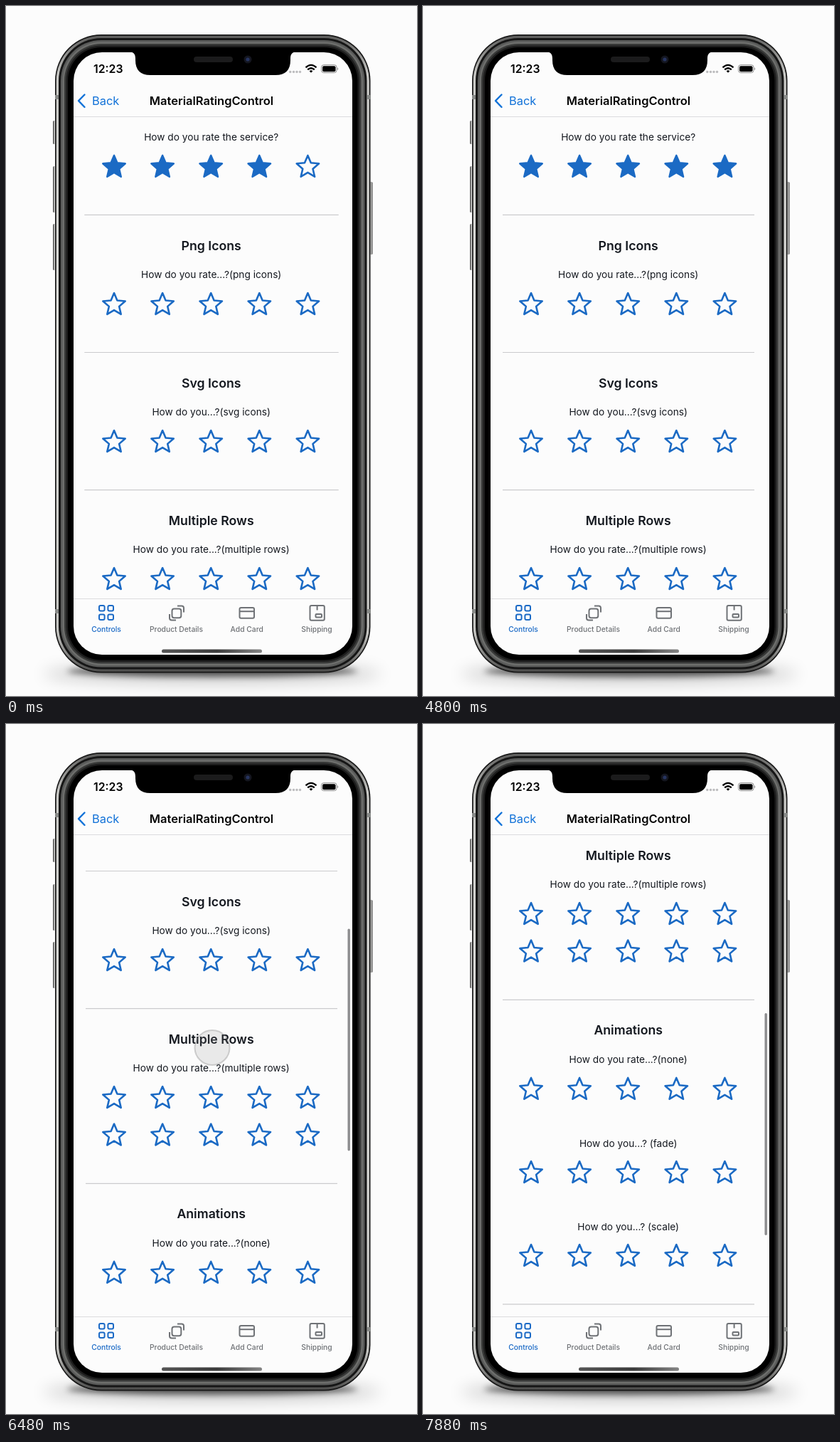
Write an HTML page that moves like this. It is 578x969 px and loops after 8000 ms.

```html
<!DOCTYPE html>
<html lang="en">
<head>
<meta charset="utf-8">
<title>Rating control</title>
<style>
html, body { margin: 0; width: 100%; height: 100%; overflow: hidden; background: #fcfcfc; }
svg { display: block; width: 100vw; height: 100vh; }
text { font-family: Inter, Roboto, sans-serif; fill: #14181f; }
.mid { text-anchor: middle; }
.head { font-size: 17.7px; font-weight: 600; }
.ask { font-size: 13.7px; }
.tab { font-size: 10.3px; font-weight: 500; fill: #6f7276; }
.icon { fill: none; stroke: #6f7276; stroke-width: 2; stroke-linejoin: round; }
.on.tab { fill: #1b6ac6; }
.on.icon { stroke: #1b6ac6; }
.star { fill: none; stroke: #1b6ac4; stroke-width: 1.65; stroke-linejoin: round; }
.star.full { fill: #1b6ac4; }
.rule { stroke: #cbcbcd; stroke-width: 1.2; }
</style>
</head>
<body>
<svg viewBox="0 0 578 969" preserveAspectRatio="none">
  <defs>
    <linearGradient id="steel" x1="0" y1="0" x2="0" y2="1">
      <stop offset="0" stop-color="#5b5b5a"/><stop offset=".06" stop-color="#c9c9c6"/>
      <stop offset=".5" stop-color="#e2e2df"/><stop offset=".94" stop-color="#c4c4c1"/>
      <stop offset="1" stop-color="#4c4c4b"/>
    </linearGradient>
    <linearGradient id="button">
      <stop offset="0" stop-color="#333"/><stop offset=".5" stop-color="#d4d4d2"/><stop offset="1" stop-color="#444"/>
    </linearGradient>
    <linearGradient id="bar">
      <stop offset="0" stop-color="#555"/><stop offset=".55" stop-color="#3c3c3c"/><stop offset="1" stop-color="#858585"/>
    </linearGradient>
    <filter id="soft" x="-20%" y="-200%" width="140%" height="500%"><feGaussianBlur stdDeviation="11"/></filter>
    <filter id="near" x="-20%" y="-200%" width="140%" height="500%"><feGaussianBlur stdDeviation="4"/></filter>
    <clipPath id="view"><rect x="95" y="156" width="392" height="676"/></clipPath>
  </defs>

  <ellipse cx="290" cy="938" rx="238" ry="13" fill="#000" opacity=".2" filter="url(#soft)"/>
  <ellipse cx="290" cy="934" rx="204" ry="8" fill="#000" opacity=".6" filter="url(#near)"/>

  <g fill="url(#button)">
    <rect x="66" y="161" width="5" height="33" rx="1.5"/>
    <rect x="66" y="225" width="5" height="65" rx="1.5"/>
    <rect x="66" y="306" width="5" height="65" rx="1.5"/>
    <rect x="510.500" y="247" width="5" height="102" rx="1.500"/>
  </g>
  <g id="body"></g>
  <g fill="#888a88">
    <rect x="69" y="125" width="5" height="6"/><rect x="508" y="125" width="5" height="6"/>
    <rect x="69" y="847" width="5" height="6"/><rect x="508" y="847" width="5" height="6"/>
  </g>
  <rect x="95" y="65" width="392" height="846" rx="40" fill="#fcfcfc"/>
  <path d="M174 64C180 65 182 68 182 74V76Q182 97 203 97H379Q400 97 400 76V74C400 68 402 65 408 64Z"/>
  <rect x="264" y="71" width="55" height="8" rx="4" fill="#1b1b1c"/>
  <circle cx="340" cy="75" r="5.500" fill="#14161f"/>
  <circle cx="340" cy="75" r="2.600" fill="#26345f"/>

  <g clip-path="url(#view)">
    <g id="list"></g>
    <rect id="thumb" x="480.500" width="3.400" height="312" rx="1.700" fill="#8c8c8e"/>
  </g>

  <text x="123" y="94" font-size="15.800" font-weight="600" style="fill:#000">12:23</text>
  <g fill="#bcbcbe">
    <circle cx="399.800" cy="92.500" r="1.700"/><circle cx="404.500" cy="92.500" r="1.700"/>
    <circle cx="409" cy="92.500" r="1.700"/><circle cx="413.500" cy="92.500" r="1.700"/>
  </g>
  <g fill="none" stroke="#000" stroke-width="2.300">
    <path d="M421.500 86.400Q429 79.400 436.500 86.400M424.200 89.400Q429 85 433.800 89.400"/>
    <path d="M426.600 91.300Q429 89.300 431.400 91.300L429 93.800Z" fill="#000" stroke="none"/>
  </g>
  <rect x="443.500" y="82.700" width="21.500" height="11" rx="3.300" fill="none" stroke="#8d8d8d"/>
  <rect x="445" y="84.200" width="18.500" height="8" rx="2"/>
  <path d="M466.200 86.200Q468.400 88.200 466.200 90.200Z" fill="#8d8d8d"/>

  <path d="M110.500 124.500L102 133.200L110.500 142" fill="none" stroke="#1272d8" stroke-width="2.400" stroke-linecap="round" stroke-linejoin="round"/>
  <text x="121" y="139" font-size="16.400" style="fill:#1272d8">Back</text>
  <text class="mid" x="289" y="139" font-size="16.500" font-weight="600" style="fill:#050505">MaterialRatingControl</text>
  <path d="M95 155.500H487M95 832.500H487" stroke="#dcdcde"/>

  <g class="icon on">
    <rect x="131" y="842" width="7.600" height="7.600" rx="2"/><rect x="143.400" y="842" width="7.600" height="7.600" rx="2"/>
    <rect x="131" y="854.400" width="7.600" height="7.600" rx="2"/><rect x="143.400" y="854.400" width="7.600" height="7.600" rx="2"/>
  </g>
  <g class="icon">
    <rect x="233.500" y="846.500" width="12.800" height="12.800" rx="3"/>
    <path d="M241 842.500H247Q250 842.500 250 845.500V851.500M230 854V859.500Q230 862.500 233 862.500H239"/>
    <rect x="328.500" y="845" width="20.500" height="14.800" rx="2"/><path d="M328.500 850.200H349"/>
    <rect x="427.500" y="842" width="20.300" height="20.800" rx="2"/><path d="M437.600 842V848.500"/>
    <rect x="435.500" y="854" width="8.500" height="4.500" rx="1"/>
  </g>
  <g class="mid">
    <text class="tab on" x="141" y="878.500">Controls</text><text class="tab" x="239.500" y="878.500">Product Details</text>
    <text class="tab" x="338.700" y="878.500">Add Card</text><text class="tab" x="437" y="878.500">Shipping</text>
  </g>
  <rect x="219" y="903.500" width="141" height="5" rx="2.500" fill="url(#bar)"/>
  <circle id="touch" fill="rgba(128,128,128,.16)" stroke="rgba(128,128,128,.34)" stroke-width="2"/>
</svg>
<script>
const LOOP = 8000, STEP = 40;
const $ = id => document.getElementById(id);

function add(parent, tag, attrs, text) {
  const node = document.createElementNS('http://www.w3.org/2000/svg', tag);
  for (const key in attrs) node.setAttribute(key, attrs[key]);
  if (text) node.textContent = text;
  return parent.appendChild(node);
}

// Phone case: nested rounded shells, [inset, fill]
[[0, '#171717'], [1.7, 'url(#steel)'], [5, '#161616'], [8, '#5a5b5a'],
 [10.5, '#6d6e6c'], [13, '#383938'], [15.500, '#1d1d1d'], [18, '#000']].forEach(([inset, fill]) =>
  add($('body'), 'rect', {
    x: 69 + inset, y: 40 + inset, width: 443.500 - 2 * inset, height: 896.500 - 2 * inset,
    rx: 65 - inset, fill
  }));

// Scrolling list
const list = $('list');
const STAR = 'M12 17.270L18.180 21L16.540 13.970L22 9.240L14.810 8.630L12 2L9.190 8.630L2 9.240L7.460 13.970L5.820 21Z';
const label = (cls, y, text) => add(list, 'text', { class: 'mid ' + cls, x: 288.700, y }, text);
const stars = (y, full = 0) => [0, 1, 2, 3, 4].map(i =>
  add(list, 'path', {
    class: i < full ? 'star full' : 'star', d: STAR,
    transform: `translate(${152 + i * 68.100} ${y}) scale(1.57) translate(-12 -11.5)`
  }));

label('ask', 189, 'How do you rate the service?');
const lastStar = stars(224.800, 4)[4];
[[342.500, 'Png Icons'], [535.500, 'Svg Icons'], [728.500, 'Multiple Rows'], [974, 'Animations']]
  .forEach(([y, text]) => label('head', y, text));
[[382, 'How do you rate...?(png icons)'], [575.300, 'How do you...?(svg icons)'],
 [768.300, 'How do you rate...?(multiple rows)'], [1014.300, 'How do you rate...?(none)'],
 [1131.500, 'How do you...? (fade)'], [1248.800, 'How do you...? (scale)']]
  .forEach(([y, text]) => label('ask', y, text));
[418, 611, 804, 856.500, 1049.800, 1167, 1284].forEach(y => stars(y));
const rules = [293.300, 486.500, 679.600, 925.400, 1352.800]
  .map(y => add(list, 'line', { class: 'rule', y1: y, y2: y }));

// Linear interpolation through [time, value] points
function at(points, t) {
  if (t <= points[0][0]) return points[0][1];
  for (let i = 1; i < points.length; i++) {
    const [t0, a] = points[i - 1], [t1, b] = points[i];
    if (t <= t1) return a + (b - a) * (t - t0) / (t1 - t0);
  }
  return points[points.length - 1][1];
}

const SCROLL = [[5760, 0], [5800, 6], [5840, 18], [5920, 52.200], [6080, 124], [6280, 208], [6480, 280],
  [6520, 297], [6640, 337], [6680, 344], [6800, 380], [7000, 439], [7200, 486], [7320, 507],
  [7440, 522], [7560, 531], [7700, 536], [7860, 538]];

// x, y (less scroll when dragging), shown from, shrinking from, fading from, gone
const TOUCHES = [
  { x: 426.300, y: 227.500, show: 3240, press: 3680, fade: 3840, gone: 4000 },
  { x: 290, y: 734.500, drag: 1, show: 5760, press: 5760, fade: 6520, gone: 6600 },
  { x: 290, y: 772, drag: 1, show: 6640, press: 6640, fade: 7320, gone: 7440 }
];

function draw(t) {
  const scroll = at(SCROLL, t);
  list.setAttribute('transform', `translate(0 ${-scroll})`);
  lastStar.setAttribute('class', t >= 4200 ? 'star full' : 'star');

  const left = at([[40, 110.300], [200, 112]], t);
  rules.forEach(r => { r.setAttribute('x1', left); r.setAttribute('x2', 578 - left); });

  $('thumb').setAttribute('y', 159 + 0.459 * scroll);
  $('thumb').setAttribute('opacity', at([[5760, 0], [5880, 1]], t));

  const hit = TOUCHES.find(p => t >= p.show && t < p.gone);
  const touch = $('touch');
  touch.setAttribute('opacity', hit ? at([[hit.fade, 1], [hit.gone, 0]], t) : 0);
  if (!hit) return;
  touch.setAttribute('cx', hit.x);
  touch.setAttribute('cy', hit.y - (hit.drag ? scroll : 0));
  touch.setAttribute('r', at([[hit.press, 29.500], [hit.press + 400, 24.500]], t));
}

const start = performance.now();
function tick() {
  const t = (performance.now() - start) % LOOP;
  draw(Math.floor(t / STEP) * STEP);
  requestAnimationFrame(tick);
}
tick();
</script>
</body>
</html>
```
